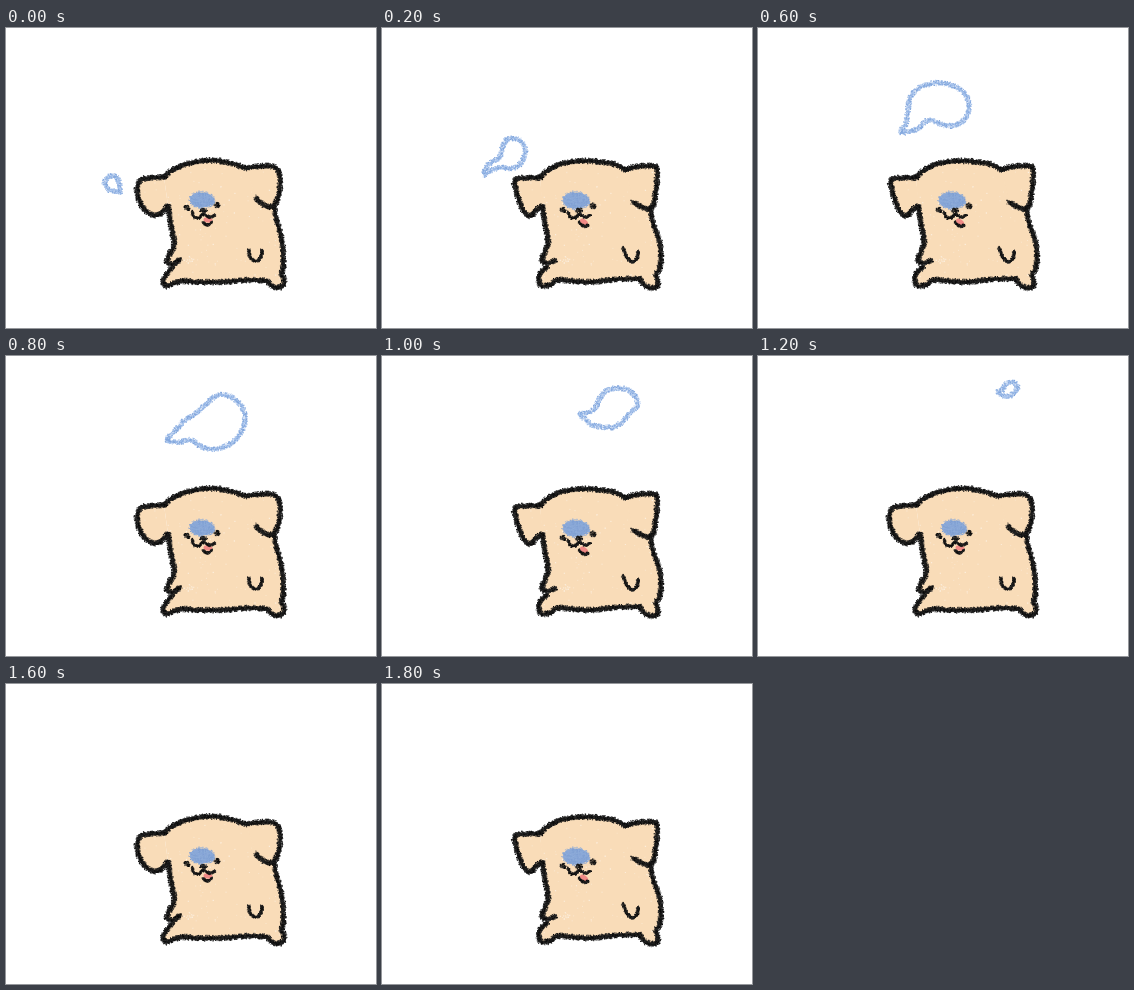
These frames come from a looping animation (370x300 px, 2 s). An HTML page with a canvas:

```html
<!DOCTYPE html>
<html lang="en">
<head>
<meta charset="utf-8">
<title>Puppy and bubble</title>
<style>
html, body { margin: 0; width: 100%; height: 100%; overflow: hidden; background: #fff; }
canvas { display: block; }
</style>
</head>
<body>
<canvas id="stage" width="370" height="300"></canvas>
<script>
const W = 370, H = 300, LOOP = 2000;
const INK = ['#080808', '#161616', '#262626'];
const BLUE = ['#84a9df', '#94b5e6', '#a9c5ee', '#7fa3da'];
const PATCH = ['#7f9fd2', '#8fadda', '#88a6d6'];

function seeded(seed) {
  return () => {
    seed = (seed + 0x6D2B79F5) | 0;
    let t = Math.imul(seed ^ (seed >>> 15), 1 | seed);
    t = (t + Math.imul(t ^ (t >>> 7), 61 | t)) ^ t;
    return ((t ^ (t >>> 14)) >>> 0) / 4294967296;
  };
}

const pts = text => text.trim().split(/\s+/).map(p => p.split(',').map(Number));

// Evenly spaced points on a Catmull-Rom curve through p
function curve(p, closed) {
  const n = p.length, out = [];
  const at = i => closed ? p[(i + n) % n] : p[Math.max(0, Math.min(n - 1, i))];
  for (let i = 0; i < (closed ? n : n - 1); i++) {
    const [a, b, c, d] = [at(i - 1), at(i), at(i + 1), at(i + 2)];
    const steps = Math.ceil(Math.hypot(c[0] - b[0], c[1] - b[1]) * 2) || 1;
    for (let s = 0; s < steps; s++) {
      const t = s / steps;
      out.push([0, 1].map(k => b[k] + t / 2 * (c[k] - a[k] +
        t * (2 * a[k] - 5 * b[k] + 4 * c[k] - d[k] + t * (3 * (b[k] - c[k]) + d[k] - a[k])))));
    }
  }
  if (!closed) out.push(p[n - 1]);
  return out;
}

function trace(g, line) {
  g.beginPath();
  line.forEach(([x, y]) => g.lineTo(x, y));
}

function fill(g, line, color) {
  trace(g, line);
  g.fillStyle = color;
  g.fill();
}

function grain(g, rnd, x, y, radius, colors) {
  const a = rnd() * 7, r = radius * Math.sqrt(rnd()), s = 0.7 + rnd() * 0.6;
  g.fillStyle = colors[rnd() * colors.length | 0];
  g.fillRect(x + Math.cos(a) * r - s / 2, y + Math.sin(a) * r - s / 2, s, s);
}

// Waxy line: a thin core surrounded by loose grains
function crayon(g, rnd, line, width, colors, core, density) {
  trace(g, line);
  g.lineCap = g.lineJoin = 'round';
  g.lineWidth = width * 0.55;
  g.globalAlpha = core;
  g.strokeStyle = colors[1];
  g.stroke();
  g.globalAlpha = 1;
  for (const [x, y] of line)
    for (let i = 0; i < density; i++) grain(g, rnd, x, y, width / 2, colors);
}

const poses = [{
  head: '158,149 165,143 180,136 200,132.5 220,134 240,140',
  earR: '240,140 247,139 258,138 268,139 273,145 274,158 272,170 268,177 262,179 255,175 250,170',
  side: '268,178 270,190 275,208 277,225 277,240 275,247 278,250 277,257 271,260 265,257 261,253',
  base: '261,253 240,252 215,254 190,254 178,253 168,255 160,258 157,254 160,247 166,239',
  left: '174,231 167,236 161,234 163,227 168,216 165,197 162,178',
  earL: '158,149 145,150 135,152 131,160 133,172 139,182 147,187 154,186 162,178',
  arm: '243,222 244,229 250,233 255,229 256,222',
  eyes: '181,180 211,177',
  mouth: '186,184 188,189 193,190 197,186 203,189 209,187',
  chin: '197,194 200,197 204,196 206,194',
  patch: [196, 172, 13, 8.5],
  tongue: [202, 192, 0.1]
}, {
  head: '158,149 165,143 178,136 196,133 215,133.5 232,136 244,142',
  earR: '244,142 252,139 265,138 274,139 275,150 274,163 271,178 266,181 258,178 251,174',
  side: '268,180 271,195 277,212 279,230 277,242 274,246 276,257 270,260 262,257 258,251',
  base: '258,251 235,251 210,254 190,253 175,252 168,257 160,258 157,254 158,245 165,239',
  left: '173,232 166,235 160,233 163,223 166,213 163,195 160,179',
  earL: '158,150 145,150 133,152 134,162 138,175 143,185 149,188 154,182 161,178',
  arm: '241,220 245,229 250,234 255,230 256,223',
  eyes: '181,182 211,178',
  mouth: '186,184 188,189 193,190 197,186 203,189 208,187',
  chin: '197,194 200,197 203,199 206,197',
  patch: [194, 172.5, 14, 9],
  tongue: [202, 194, 0.6]
}];

function drawDog(pose) {
  const cv = document.createElement('canvas');
  cv.width = W;
  cv.height = H;
  const g = cv.getContext('2d'), rnd = seeded(42);
  const line = name => curve(pts(pose[name]));
  const ink = (name, w, d = 4) => crayon(g, rnd, line(name), w, INK, 0.9, d);
  const skin = '#f9dcb8';

  fill(g, ['head', 'side', 'base', 'left'].flatMap(line), skin);
  fill(g, line('earR'), skin);
  fill(g, line('earL'), skin);
  g.globalCompositeOperation = 'source-atop';
  for (let i = 0; i < 150; i++)
    grain(g, rnd, 130 + rnd() * 150, 133 + rnd() * 125, 2, ['#fdf0df', '#fbe6cc']);
  for (let i = 0; i < 14; i++) grain(g, rnd, 184, 232, 4, ['#fdf0df']);
  g.globalCompositeOperation = 'source-over';

  const [px, py, rx, ry] = pose.patch;
  g.fillStyle = '#8ba9d8';
  g.beginPath();
  g.ellipse(px, py, rx - 1, ry - 1, 0, 0, 7);
  g.fill();
  for (let i = 0; i < 420; i++) {
    const a = rnd() * 7, r = Math.sqrt(rnd());
    grain(g, rnd, px + Math.cos(a) * r * rx, py + Math.sin(a) * r * ry, 1, PATCH);
  }

  for (const part of ['head', 'earR', 'side', 'base', 'left', 'earL']) ink(part, 6);
  ink('arm', 3.6, 3);

  const [tx, ty, tilt] = pose.tongue;
  g.fillStyle = '#f08a86';
  g.beginPath();
  g.ellipse(tx, ty, 4.5, 2.6, tilt, 0, 7);
  g.fill();
  ink('mouth', 3.4, 3);
  ink('chin', 3, 3);
  for (const [x, y] of pts(pose.eyes))
    for (let i = 0; i < 60; i++) grain(g, rnd, x, y, 3.1, INK);
  for (let i = 0; i < 60; i++) grain(g, rnd, 195 + rnd() * 4, 182.5, 2.4, INK);
  return cv;
}

const swoop = pts('117,124 119,114 128,106 138,99 143,86 148,74 157,72 168,75 175,86 174,98 167,110 157,115 143,114 131,116 123,120');
const curl = pts('198,58 207,56 213,52 218,42 224,35 234,32 246,34 254,42 255,50 247,58 240,66 232,71 220,71 210,69 204,64');
const resize = (p, cx, cy, k, x, y) => p.map(q => [x + (q[0] - cx) * k, y + (q[1] - cy) * k]);

// Bubble outlines by time, each starting at the tail tip
const bubbles = [
  [0, pts('102,161 99,157 99,153 101,150 104,148 107,148 110,149 112,152 113,155 114,159 114,164 111,163 108,163 106,163 104,162')],
  [100, resize(swoop, 117, 124, 0.55, 95, 158)],
  [400, swoop],
  [600, pts('143,104 148,95 150,82 153,68 163,59 178,55 196,58 208,68 211,80 205,93 192,98 180,95 170,92 162,99 153,103')],
  [800, pts('161,84 168,76 178,65 190,57 201,47 212,39 225,41 236,51 239,65 234,78 224,88 208,93 194,90 185,84 173,86')],
  [1000, curl],
  [1200, resize(curl, 228, 51, 0.35, 250, 33)]
];

function bubbleAt(t) {
  const i = Math.max(1, bubbles.findIndex(b => b[0] >= t));
  const [t0, a] = bubbles[i - 1], [t1, b] = bubbles[i];
  const k = (t - t0) / (t1 - t0);
  return a.map((p, j) => p.map((v, c) => v + (b[j][c] - v) * k));
}

const ctx = document.getElementById('stage').getContext('2d');
const dogs = poses.map(drawDog);
const start = performance.now();
let shown = -1;

function frame() {
  const step = Math.floor((performance.now() - start) % LOOP / 100);
  if (step !== shown) {
    shown = step;
    ctx.fillStyle = '#fff';
    ctx.fillRect(0, 0, W, H);
    ctx.drawImage(dogs[(step >> 1) % 2], 0, 0);
    if (step <= 12)
      crayon(ctx, seeded(step + 7), curve(bubbleAt(step * 100), true), 5.6, BLUE, 0.35, 3);
  }
  requestAnimationFrame(frame);
}
frame();
</script>
</body>
</html>
```
